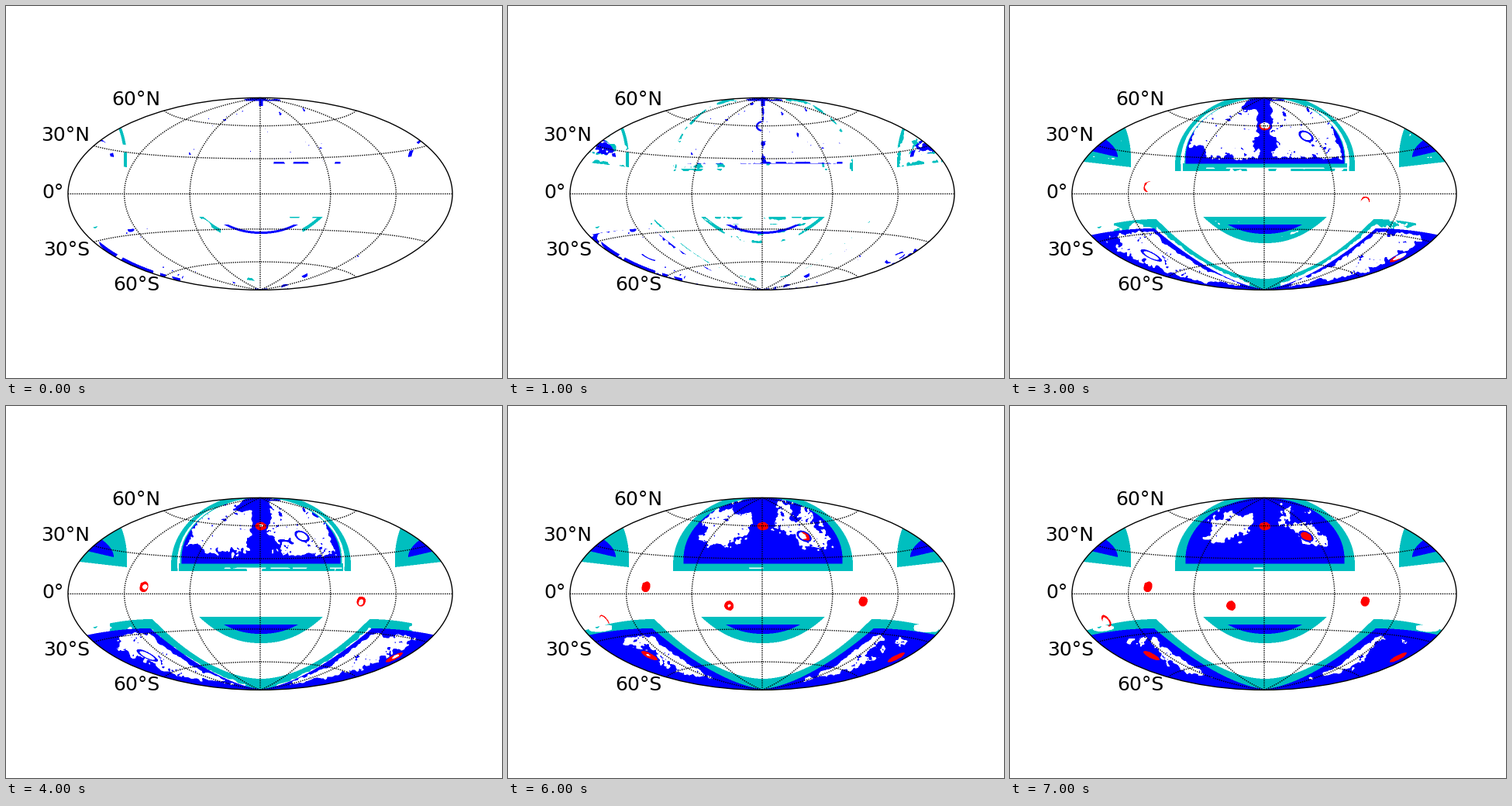
A matplotlib script for the animation above (8 s loop, 640x480 px).

```python
import numpy as np
import matplotlib.pyplot as plt
from matplotlib.animation import FuncAnimation
from matplotlib.patches import Ellipse

W, H, SS = 640, 480, 2
STEPS = 8
CX, CY, RX, RY = 328, 242.4, 248, 124
CYAN, BLUE, RED = (0, .75, .75), (0, 0, 1), (1, 0, 0)
DISC = 4  # radius of the red discs, in degrees of sky

rng = np.random.default_rng(11)
X, Y = np.meshgrid((np.arange(W * SS) + .5) / SS, (np.arange(H * SS) + .5) / SS)
U = np.abs(X - 329)  # the regions mirror about this axis


def noise(sigma):
    """Smooth unit-variance noise with a grain of sigma pixels."""
    s = sigma * SS
    fy = np.fft.fftfreq(H * SS)[:, None]
    fx = np.fft.rfftfreq(W * SS)[None, :]
    spec = np.fft.rfft2(rng.standard_normal(X.shape))
    field = np.fft.irfft2(spec * np.exp(-2 * (np.pi * s) ** 2 * (fx**2 + fy**2)), X.shape)
    return field / field.std()


def rho(x, y, rx, ry, ang=0, across=X):
    """Scaled distance from a tilted ellipse's centre, 1 on its edge."""
    c, s = np.cos(np.radians(ang)), np.sin(np.radians(ang))
    dx, dy = across - x, Y - y
    return np.hypot((dx * c + dy * s) / rx, (dy * c - dx * s) / ry)


def bell(v, mid, width):
    return np.exp(-((v - mid) / width) ** 2)


def hammer(lon, lat):
    lon, lat = np.radians(lon) / 2, np.radians(lat)
    z = np.sqrt(1 + np.cos(lat) * np.cos(lon))
    return CX + RX * np.cos(lat) * np.sin(lon) / z, CY - RY * np.sin(lat) / z


def sky(x, y):
    """Pixel position to a unit vector on the sphere."""
    a, b = (x - CX) / RX * np.sqrt(8), (CY - y) / RY * np.sqrt(2)
    z = np.sqrt(np.maximum(1 - (a / 4) ** 2 - (b / 2) ** 2, .5))
    lon = 2 * np.arctan2(z * a, 2 * (2 * z * z - 1))
    sin_lat = np.clip(z * b, -1, 1)
    cos_lat = np.sqrt(1 - sin_lat**2)
    return cos_lat * np.cos(lon), cos_lat * np.sin(lon), sin_lat


def fill(field, mask, t, lumpy):
    """Let a region appear at time t, made uneven by noise."""
    t = t + lumpy * (.8 * soft + .5 * fine)
    field[mask] = np.clip(t, .6, None)[mask]


soft, fine, dust = noise(4.5), noise(1.3), noise(.9)
globe = ((X - CX) / RX) ** 2 + ((Y - CY) / RY) ** 2
inside = globe < 1
rim = (1 - np.sqrt(globe)) * 130
cyan, blue, red = (np.full(X.shape, 99.) for _ in range(3))

# northern dome
q_out = np.hypot(U / 116, np.maximum(205 - Y, 0) / 93)
q_in = np.hypot(U / 102.5, np.maximum(197 - Y, 0) / 78.5)
dome = inside & (q_out < 1) & (Y < 213)
core = inside & (q_in < 1) & (Y < 203.5)
r = (1 - q_out) / np.maximum(q_in - q_out, 1e-3)
arch = 1 + 4.2 * bell(r, .7, .22) * np.clip((Y - 122) / 14, 0, 1)
dashes = 2.1 + 3 * bell(X, 321, 24) + .7 * soft
floor = np.where(Y < 208.5, 1.4, np.where(Y < 210, 1.6 + dashes, dashes))
fill(cyan, dome & ~core, np.where((Y > 203) & (U < 106), floor, arch), .25)

t = np.minimum(np.sqrt(np.maximum(204 - Y, 0)) + .5 * (X < 300), 6)
for early in (1 + U / 4,
              1.2 + (1 - q_in) * 45 + np.maximum(165 - Y, 0) / 9 + .8 * (X < 329),
              1 + rho(238, 195, 11, 9) ** 2,
              1 + rho(329, 177, 10, 9) ** 2,
              1 + rho(312, 128, 14, 5, -30) ** 2):
    t = np.minimum(t, early)
t += 3.2 * np.exp(-rho(284, 156, 33, 14, -28) ** 4)
t += 2.6 * np.exp(-rho(386, 165, 23, 12, 25) ** 4)
fill(blue, core, t, np.clip(t / 5, .2, .9))

# blocks at the two side edges
arc = np.maximum(195 - Y, 0) ** 2
side_edge = U - (173 + .005 * arc)
side_low = 208 + .115 * (173 - U) - Y
core_edge = U - (190 + .03 * arc)
side = inside & (side_edge > 0) & (side_low > 0)
side_core = side & (core_edge > 0) & (Y < 195 - .23 * (U - 190))
depth = np.minimum(side_edge / 17, side_low / 13)
fill(cyan, side & ~side_core, 1 + 1.7 * bell(depth, .6, .25), .4)
fill(blue, side_core, 1.3 + 0 * X, .5)

# southern lens
lens_low = 272 + 34 * (1 - np.minimum(U / 80, 1) ** 2.2)
core_low = 282 + 12 * (1 - np.minimum(U / 48, 1) ** 2.2)
lens = (Y > 272) & (Y < lens_low)
lens_core = (Y > 282) & (Y < core_low)
depth = np.minimum((lens_low - Y) / 12, (Y - 272) / 10)
fill(cyan, lens & ~lens_core, 1 + 1.6 * bell(depth, .6, .25), .4)
fill(blue, lens_core, .9 + (core_low - Y) / 8, .4)

# southern cap
cap_edge = np.where(U < 140, 352 - 77 * (U / 140) ** 1.85, 275 + .0018 * (U - 140) ** 2)
cap_in = np.where(U < 143, 365 - 78 * (U / 143) ** 1.55, 287 + .0013 * (U - 143) ** 2)
cap = inside & (Y > cap_edge)
cap_core = cap & (Y > cap_in)
s = (Y - cap_edge) / np.maximum(cap_in - cap_edge, 1)
t = np.where(U < 20, 1.4 + .5 * s, 1 + 3.4 * s)
t = np.where(U > 195, 5.3, np.where(U > 140, 2.4 + .6 * s + .5 * soft, t))
t += 6 * np.exp(-rho(208, 287, 15, 4, 5, U) ** 4) * np.where(X > 329, 1, .7)
fill(cyan, cap & ~cap_core, t, .35)

t = np.minimum(5.4, np.minimum(1.2 + (Y - cap_in) / 3, 1 + rim / 3))
t = np.minimum(t, 2.6 + rho(125, 302, 20, 10, 25) ** 2)
t += 3 * np.exp(-rho(118, 323, 42, 7, -37, U) ** 4)
t += 3 * np.exp(-rho(70, 347, 36, 4, -18, U) ** 4)
fill(blue, cap_core, t, np.clip(t / 4.5, .25, 1))

# stray specks
for level, when in ((2.5, 1.6), (3.3, 0)):
    specks = (core | cap_core) & (dust + .6 * soft > level)
    blue[specks] = np.minimum(blue, when)[specks]

# seeds along the edges, there from the start: field, strip, noise level to pass
for field, strip, level in (
        (blue, lens_core & (core_low - Y < 3), -1.3),
        (blue, core & (Y > 201), 1.1 - 1.4 * bell(X, 376, 30)),
        (blue, core & (U < np.where(Y < 122.5, 25, 2.5)) & (Y < 129), -.6),
        (blue, side_core & (core_edge < 4.5), -.3),
        (blue, cap_core & (rim < 3.5) & ((X < 225) | (U < 8)), -.6),
        (blue, cap_core & (Y - cap_in < 4), 1.3),
        (cyan, lens & (U > 52) & (lens_low - Y < 5), -.4),
        (cyan, lens & (X > 345) & (Y < 273.5), .2),
        (cyan, side & (side_edge < 4), .4),
        (cyan, cap & (Y - cap_edge < 3), 1.7)):
    field[strip & (soft > level)] = 0

# red discs, round on the sky: x, y, start, time to fill, leading side
here = sky(X, Y)
for x, y, start, span, lead in ((329, 155, 1.8, 3.8, 90), (178, 233, 1.8, 4.5, 200),
                                (458.5, 252, 1.75, 4.5, 290), (501, 324.5, 1.5, 4.5, 100),
                                (182, 322, 4.8, 2, 20), (382, 168, 5.3, 1.6, 0),
                                (285, 257.5, 4.9, 1.7, 215), (124, 277, 3.9, 8, 300)):
    cos_d = sum(a * b for a, b in zip(here, sky(x, y)))
    d = np.degrees(np.arccos(np.clip(cos_d, -1, 1))) / DISC
    toward = d * np.cos(np.arctan2(Y - y, X - x) - np.radians(lead))
    disc = inside & (d + .04 * fine < 1)
    red[disc] = (start + span * (.55 * (1 - d) + .22 * (1 - toward)) + .1 * fine)[disc]
    if core[int(y * SS), int(x * SS)] or cap_core[int(y * SS), int(x * SS)]:
        blue[d < 1] = 9
        ring = inside & (np.abs(d - 1.12) < .2)
        blue[ring] = np.minimum(blue, np.maximum(1.5 + .6 * soft, 0))[ring]


def picture(step):
    img = np.ones(X.shape + (3,))
    for field, colour in ((cyan, CYAN), (blue, BLUE), (red, RED)):
        img[(field <= step) & inside] = colour
    return img.reshape(H, SS, W, SS, 3).mean(axis=(1, 3))


fig = plt.figure(figsize=(W / 100, H / 100), dpi=100, facecolor="white")
ax = fig.add_axes([0, 0, 1, 1])
ax.axis("off")
pictures = [picture(k) for k in range(STEPS)]
view = ax.imshow(pictures[0], extent=(0, W, H, 0), interpolation="nearest", aspect="auto")
ax.set_xlim(0, W)
ax.set_ylim(H, 0)

dotted = dict(color="black", lw=1, ls=(0, (1, 1)), dash_capstyle="butt")
lons, lats = np.linspace(-180, 180, 3601), np.linspace(-90, 90, 1801)
for lat in range(-60, 61, 30):
    ax.plot(*hammer(lons, np.full_like(lons, lat)), **dotted)
    # labels stand above the edge in the north, below it in the south
    x, y = hammer(-180, lat)
    name = f"{abs(lat)}°" + ("N" if lat > 0 else "S" if lat else "")
    ax.text(x - 5, y + 5.5 - 12.2 * np.sign(lat), name, size=18, family="DejaVu Sans",
            ha="right", va="baseline")
for lon in range(-120, 121, 60):
    ax.plot(*hammer(np.full_like(lats, lon), lats), **dotted)
ax.add_patch(Ellipse((CX, CY), 2 * RX, 2 * RY, fill=False, ec="black", lw=1, zorder=5))


def update(step):
    view.set_data(pictures[step])
    return [view]


anim = FuncAnimation(fig, update, frames=STEPS, interval=1000, repeat=True, repeat_delay=0)
plt.show()
```
